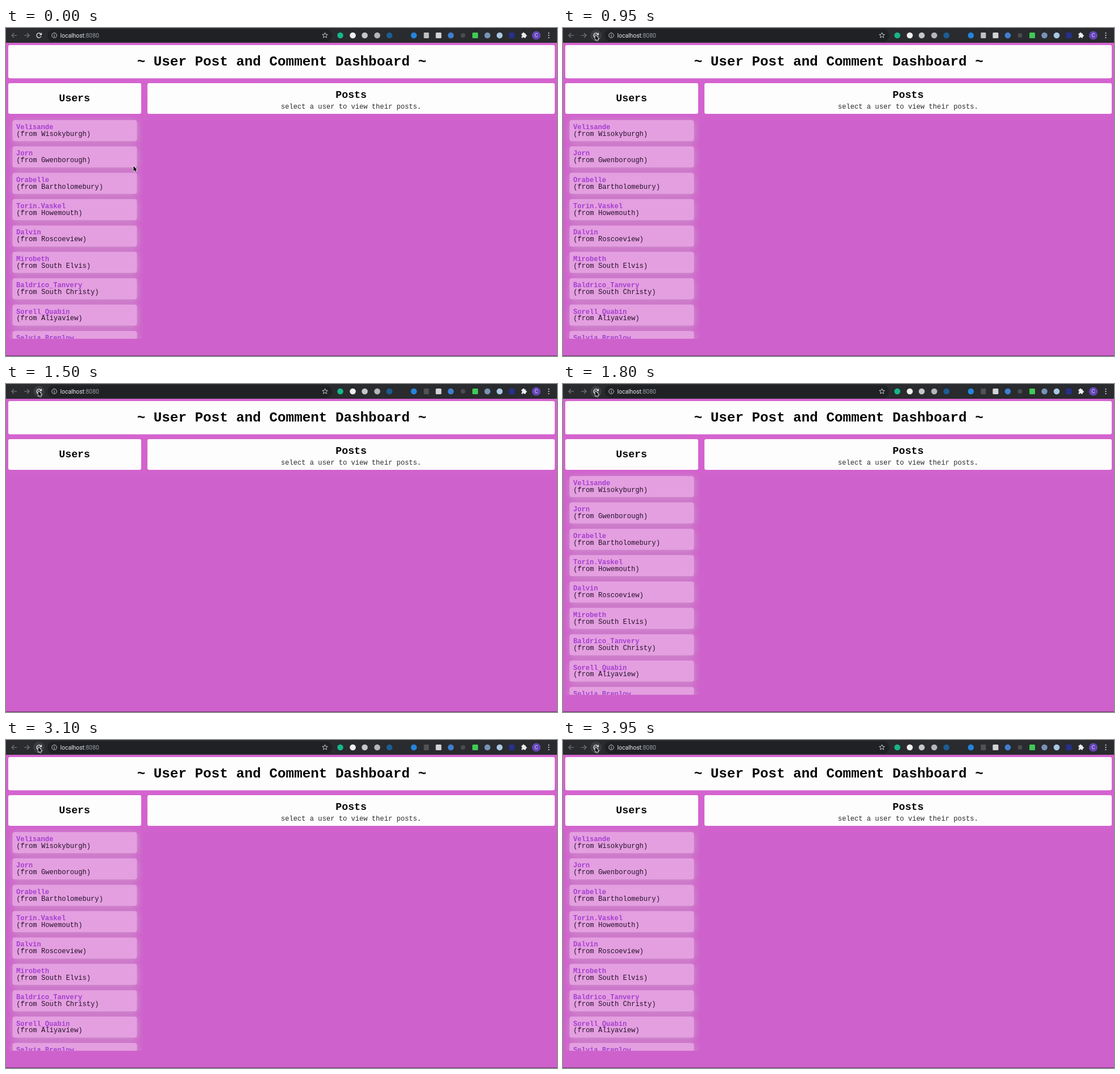
Write an HTML page with a canvas that moves like this. It is 970 px wide and 577 px high and loops after 4 s.

```html
<!DOCTYPE html>
<html lang="en">
<head>
<meta charset="utf-8">
<title>Dashboard</title>
<style>
  html, body { margin: 0; width: 100%; height: 100%; overflow: hidden; background: #ce61cb; }
  canvas { display: block; width: 970px; height: 577px; }
</style>
</head>
<body>
<canvas id="stage" width="970" height="577"></canvas>
<script>
const ctx = document.getElementById('stage').getContext('2d');
const LOOP = 4000;
const MONO = '"Liberation Mono", "Courier New", monospace';
const SANS = 'Roboto, Inter, sans-serif';

const users = [
  ['Velisande', 'Wisokyburgh'],
  ['Jorn', 'Gwenborough'],
  ['Orabelle', 'Bartholomebury'],
  ['Torin.Vaskel', 'Howemouth'],
  ['Dalvin', 'Roscoeview'],
  ['Mirobeth', 'South Elvis'],
  ['Baldrico_Tanvery', 'South Christy'],
  ['Sorell_Quabin', 'Aliyaview'],
  ['Selvia.Brenlow', '']
];

// [kind, centre x, colour] of the toolbar extensions
const badges = [
  ['dot', 588.5, '#16b58a'], ['dot', 610.5, '#f0f0f0'], ['dot', 631.5, '#c4c6c8'],
  ['dot', 653.5, '#b4b6b9'], ['dot', 675, '#1c5c94'], ['dot', 718, '#2484dc'],
  ['box', 761.5, '#d2d3d4'], ['dot', 783, '#3f7fd0'], ['faint', 804.5, '#4a4c4f'],
  ['box', 826, '#3fca55'], ['dot', 847.5, '#7892b4'], ['dot', 869, '#a9c6e2'],
  ['box', 890.5, '#27318a']
];

// the list is empty while each reload fetches its users
const reloads = [[1300, 1700], [3500, 3800]];
const loading = t => reloads.some(([from, to]) => t >= from && t < to);
const ease = p => p * p * (3 - 2 * p);
const clamp = v => Math.max(0, Math.min(1, v));
const mix = (a, b, p) => a + (b - a) * p;

function box(x, y, w, h, r, color) {
  ctx.fillStyle = color;
  ctx.beginPath();
  ctx.roundRect(x, y, w, h, r);
  ctx.fill();
}

function dot(x, y, r, color) {
  ctx.fillStyle = color;
  ctx.beginPath();
  ctx.arc(x, y, r, 0, Math.PI * 2);
  ctx.fill();
}

function line(points, color, width = 1.2) {
  ctx.strokeStyle = color;
  ctx.lineWidth = width;
  ctx.beginPath();
  points.forEach(([x, y]) => ctx.lineTo(x, y));
  ctx.stroke();
}

function text(str, x, y, font, color, align = 'left') {
  ctx.font = font;
  ctx.fillStyle = color;
  ctx.textAlign = align;
  ctx.fillText(str, x, y);
}

function arrow(x, dir, color) {
  line([[x - 4.5, 13], [x + 4.5, 13]], color);
  line([[x + dir * 0.5, 9], [x + dir * 4.5, 13], [x + dir * 0.5, 17]], color);
}

function reloadIcon(x, y) {
  ctx.strokeStyle = '#e4e5e7';
  ctx.lineWidth = 1.4;
  ctx.beginPath();
  ctx.arc(x, y, 4, 0.35, Math.PI * 1.75);
  ctx.stroke();
  ctx.fillStyle = '#e4e5e7';
  ctx.beginPath();
  ctx.moveTo(x + 5, y - 5);
  ctx.lineTo(x + 5, y - 0.5);
  ctx.lineTo(x + 0.5, y - 0.5);
  ctx.fill();
}

function star(x, y) {
  ctx.strokeStyle = '#c5c7ca';
  ctx.lineWidth = 1;
  ctx.beginPath();
  for (let i = 0; i < 10; i++) {
    const a = -Math.PI / 2 + i * Math.PI / 5, r = i % 2 ? 2.2 : 5;
    ctx.lineTo(x + r * Math.cos(a), y + r * Math.sin(a));
  }
  ctx.closePath();
  ctx.stroke();
}

function toolbar(t, hover) {
  ctx.fillStyle = '#292b2e';
  ctx.fillRect(0, 0, 970, 26);
  box(73, 2, 501, 22, 11, '#1f2124');
  arrow(14.5, -1, '#75777a');
  arrow(36.5, 1, '#75777a');
  if (hover) dot(58, 13, 10, '#3a3c3f');
  reloadIcon(58, 13);

  ctx.strokeStyle = '#c5c7ca';
  ctx.lineWidth = 1;
  ctx.beginPath();
  ctx.arc(85, 13, 4.3, 0, Math.PI * 2);
  ctx.stroke();
  line([[85, 12.5], [85, 15.5]], '#c5c7ca');
  line([[85, 10.4], [85, 11.5]], '#c5c7ca');

  const font = '10.4px ' + SANS;
  text('localhost', 95.5, 16.6, font, '#e8eaed');
  text(':8080', 95.5 + ctx.measureText('localhost').width, 16.6, font, '#9aa0a6');
  star(561.5, 13);

  for (const [kind, x, color] of badges) {
    if (kind === 'box') box(x - 5, 8, 10, 10, 1.5, color);
    else dot(x, 13, kind === 'faint' ? 4 : 5.3, color);
  }
  box(735.5, 8, 9, 10, 1, t < reloads[0][0] ? '#bfc1c3' : '#505255');

  // extensions menu
  box(907.5, 9.5, 7.5, 8, 1, '#eceded');
  dot(911, 9.3, 1.6, '#eceded');
  dot(915.3, 13.5, 1.6, '#eceded');
  dot(907.5, 13.7, 1.3, '#292b2e');
  dot(911, 17.6, 1.3, '#292b2e');

  dot(933.5, 13, 7.6, '#6545b8');
  text('C', 933.5, 16.4, '9px ' + SANS, '#e6def5', 'center');
  for (let i = -1; i < 2; i++) dot(955.5, 13 + i * 4, 1.1, '#dfe0e2');
}

function page() {
  const bg = ctx.createLinearGradient(0, 26, 0, 170);
  bg.addColorStop(0, '#d664d0');
  bg.addColorStop(0.85, '#d362ce');
  bg.addColorStop(1, '#ce61cb');
  ctx.fillStyle = bg;
  ctx.fillRect(0, 26, 970, 551);

  box(4, 30, 962, 58.5, 3, '#fdfdfd');
  box(4, 97, 234, 54, 3, '#fdfdfd');
  box(249, 97, 717, 54, 3, '#fdfdfd');

  text('~ User Post and Comment Dashboard ~', 485.3, 65.5, 'bold 24.25px ' + MONO, '#050505', 'center');
  text('Users', 120.6, 129.2, 'bold 18.2px ' + MONO, '#050505', 'center');
  text('Posts', 607.6, 123, 'bold 18.2px ' + MONO, '#050505', 'center');
  text('select a user to view their posts.', 607.5, 141.5, '12.12px ' + MONO, '#2c2c2c', 'center');
}

function userList() {
  ctx.save();
  ctx.beginPath();
  ctx.rect(2, 152, 240, 394.5);
  ctx.clip();
  users.forEach(([name, city], i) => {
    const y = 162 + i * 46.36;
    ctx.save();
    ctx.shadowColor = 'rgba(204, 160, 202, 0.9)';
    ctx.shadowBlur = 13;
    ctx.shadowOffsetX = 1;
    ctx.shadowOffsetY = 2;
    box(11.5, y, 219, 37, 4, '#e49fe0');
    ctx.restore();
    text(name, 17.9, y + 16, 'bold 12.12px ' + MONO, '#a53fd0');
    if (city) text('(from ' + city + ')', 18.3, y + 27.8, '12.12px ' + MONO, '#24122a');
  });
  ctx.restore();
}

function pointer(x, y) {
  const shape = [[0, 0], [0, 9.2], [2.1, 7.3], [3.5, 10.3], [5, 9.6], [3.7, 6.7], [6.4, 6.6]];
  ctx.beginPath();
  shape.forEach(([dx, dy]) => ctx.lineTo(x + dx, y + dy));
  ctx.closePath();
  ctx.lineJoin = 'round';
  ctx.strokeStyle = '#f4f4f4';
  ctx.lineWidth = 1.6;
  ctx.stroke();
  ctx.fillStyle = '#000';
  ctx.fill();
}

function draw(now) {
  const t = now % LOOP;
  const p = ease(clamp((t - 200) / 600));
  const x = mix(224.5, 56.8, p);
  const y = mix(242.8, 12.3, p);
  page();
  if (!loading(t)) userList();
  toolbar(t, Math.hypot(x - 58, y - 13) < 11);
  ctx.fillStyle = '#6d386c';
  ctx.fillRect(0, 576, 970, 1);
  pointer(x, y);
}

let start;
function tick(now) {
  start ??= now;
  draw(now - start);
  requestAnimationFrame(tick);
}
draw(0);
requestAnimationFrame(tick);
</script>
</body>
</html>
```
